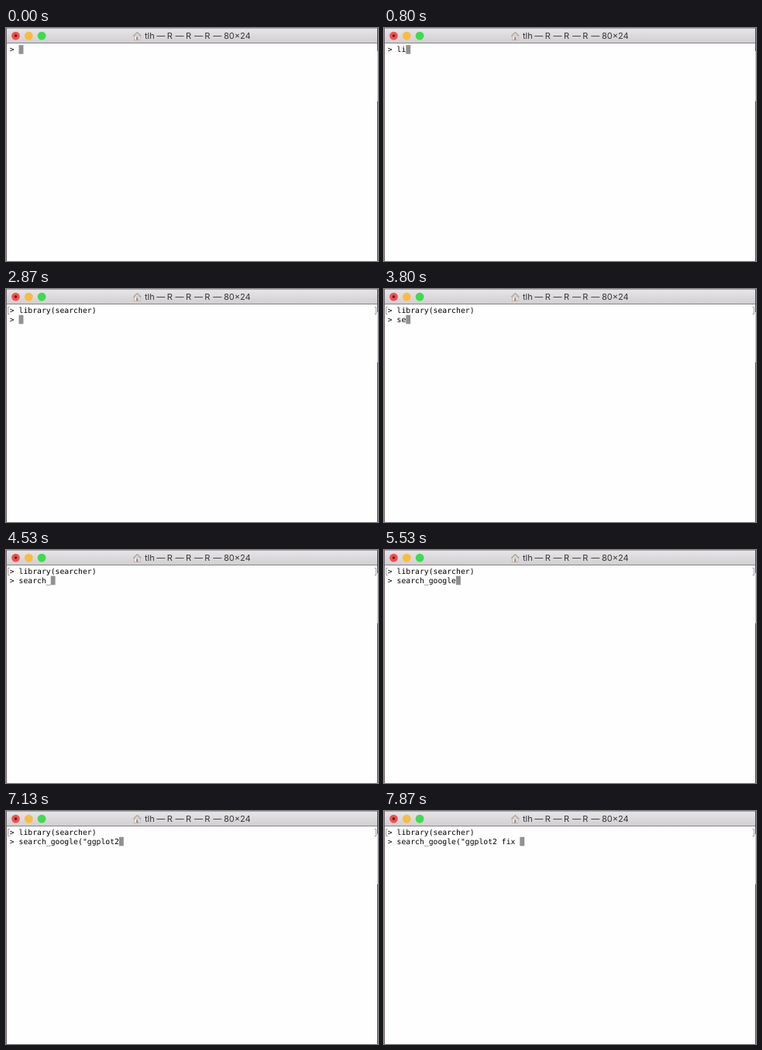
An HTML page with a canvas that plays this animation: 480 px wide and 302 px high, repeating every 8 s.

```html
<!DOCTYPE html>
<html lang="en">
<head>
<meta charset="utf-8">
<title>Terminal</title>
<style>
html, body { margin: 0; width: 100%; height: 100%; overflow: hidden; background: #fefefe; }
canvas { display: block; width: 480px; height: 302px; }
</style>
</head>
<body>
<canvas id="stage"></canvas>
<script>
const W = 480, H = 302, LOOP = 8000, ENTER = 2870;
const COL = 5.88, LEFT = 4.8, TOP = 22.1, ROW = 11.6;
const MONO = '9.77px "DejaVu Sans Mono", monospace';
const SANS = '11px Inter, sans-serif';

// Each burst of typing runs evenly from its first to its last key.
const burst = (text, from, to = from) => ({ text, from, to });
const lines = [
  [burst('library(', 670, 1130), burst('sea', 1330, 1600),
   burst('rche', 1670, 1800), burst('r', 2000), burst(')', 2600)],
  [burst('s', 3400), burst('earch', 3730, 4200), burst('_', 4530),
   burst('go', 4930, 5130), burst('ogle', 5270, 5530),
   burst('("', 5730, 5930), burst('g', 6530), burst('gpl', 6670, 6800),
   burst('ot2', 7000, 7130), burst(' fi', 7400, 7530), burst('x ', 7670, 7870)]
];

function typed({ text, from, to }, t) {
  if (t < from) return '';
  if (t >= to) return text;
  return text.slice(0, 1 + Math.floor((t - from) / (to - from) * (text.length - 1)));
}

const canvas = document.getElementById('stage');
const ctx = canvas.getContext('2d');
const dpr = window.devicePixelRatio || 1;
canvas.width = W * dpr;
canvas.height = H * dpr;
ctx.scale(dpr, dpr);
if ('textRendering' in ctx) ctx.textRendering = 'geometricPrecision';

function rect(color, x, y, w, h) {
  ctx.fillStyle = color;
  ctx.fillRect(x, y, w, h);
}

function disc(color, x, r) {
  ctx.beginPath();
  ctx.arc(x, 10.1, r, 0, Math.PI * 2);
  ctx.fillStyle = color;
  ctx.fill();
}

function house() {
  rect('#eeebe9', 165.6, 9.5, 7.4, 6);
  rect('#a98d80', 168, 11.5, 2.6, 4);
  ctx.beginPath();
  ctx.moveTo(164.2, 10.6);
  ctx.lineTo(169.3, 5.8);
  ctx.lineTo(174.4, 10.6);
  ctx.strokeStyle = '#b0a5a1';
  ctx.lineWidth = 1.4;
  ctx.stroke();
  ctx.lineWidth = 0.7;
  ctx.strokeRect(165.6, 10, 7.4, 5.5);
}

function titleBar() {
  const shade = ctx.createLinearGradient(0, 0, 0, 19);
  shade.addColorStop(0, '#e8e6e8');
  shade.addColorStop(1, '#d1cfd1');
  rect(shade, 0, 0, W, 19);
  rect('#8c8a8c', 0, 0, W, 0.7);
  rect('#888688', 0, 19, W, 1);

  disc('#f44f50', 12.5, 5.4);
  disc('#6d0f10', 12.5, 1.8);
  disc('#fbbb3f', 29.3, 5.4);
  disc('#3edb4e', 46.1, 5.4);

  house();
  ctx.font = SANS;
  ctx.fillStyle = '#363436';
  ctx.fillText('tlh', 179, 14.2);
  for (let i = 0; i < 4; i++) {
    const x = 194.3 + i * 24.3;
    ctx.fillText('—', x, 14.2);
    if (i < 3) ctx.fillText('R', x + 13.4, 14.2);
  }
  ctx.fillText('80×24', 281, 14.2);
}

function bracket(x, dir) {
  ctx.beginPath();
  ctx.moveTo(x + dir * 2, TOP + 1.4);
  ctx.lineTo(x, TOP + 1.4);
  ctx.lineTo(x, TOP + 10.4);
  ctx.lineTo(x + dir * 2, TOP + 10.4);
  ctx.strokeStyle = '#969496';
  ctx.lineWidth = 0.9;
  ctx.stroke();
}

function prompt(row, t) {
  const text = '> ' + lines[row].map(b => typed(b, t)).join('');
  ctx.font = MONO;
  ctx.fillStyle = '#000';
  [...text].forEach((ch, i) =>
    ctx.fillText(ch, LEFT + i * COL, TOP + row * ROW + 9.1));
  return text.length;
}

function draw(t) {
  rect('#fefefe', 0, 0, W, H);
  titleBar();
  rect('#6b6066', 0, 0, 1, H);
  rect('#4c4a4c', 479, 0, 1, H);
  rect('#c4c2c4', 479, 30, 1, 65);

  let row = 0, col = prompt(0, t);
  if (t >= ENTER) {
    bracket(2.7, 1);
    bracket(477.5, -1);
    row = 1;
    col = prompt(1, t);
  }
  rect('#919092', LEFT + col * COL, TOP + row * ROW, COL, ROW);
}

const start = performance.now();
function tick() {
  draw((performance.now() - start) % LOOP);
  requestAnimationFrame(tick);
}
tick();
</script>
</body>
</html>
```
